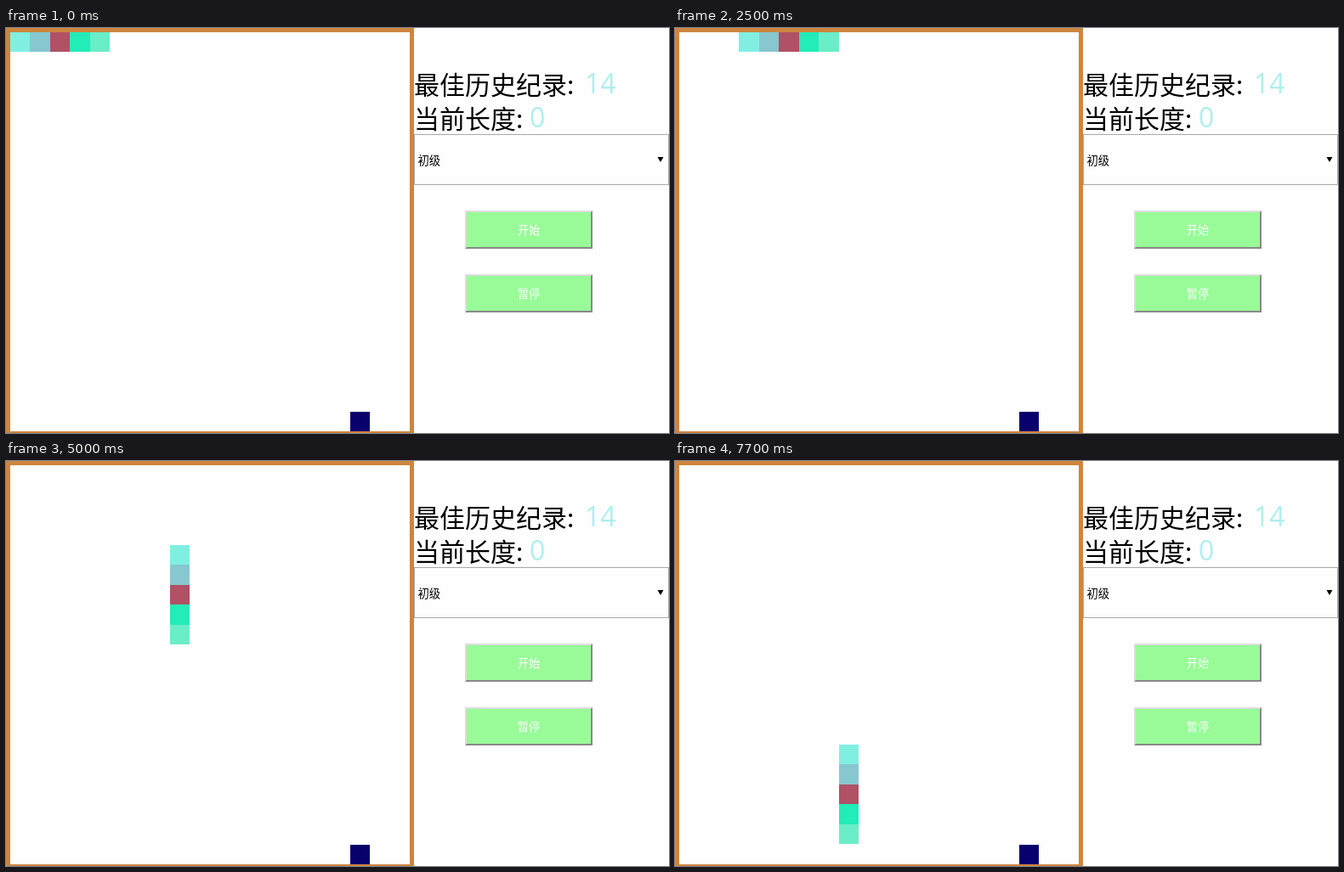
Recreate the animation shown at these times as an HTML page. Size 780x477 px, loop 8000 ms.

```html
<!DOCTYPE html>
<html lang="zh">
<head>
<meta charset="utf-8">
<style>
html, body { margin: 0; width: 100%; height: 100%; overflow: hidden; background: #fefefe; }
svg { display: block; }
text { font: 13.33px 'Noto Sans CJK SC', 'Noto Sans CJK', sans-serif; }
.label { font-size: 30px; }
.num { font: 32px 'Open Sans', 'Noto Sans', sans-serif; fill: #afeeee; }
.btn text { fill: #fff; text-anchor: middle; }
.light { fill: #ddd; }
.dark { fill: #888; }
.down .light { fill: #888; }
.down .dark { fill: #ddd; }
</style>
</head>
<body>
<svg width="780" height="477" viewBox="0 0 780 477">
  <rect x="2.5" y="2.5" width="475" height="475" fill="#fefefe" stroke="#cd853f" stroke-width="5"/>
  <rect x="0" y="475" width="480" height="2" fill="#cd853f"/>
  <rect x="405" y="452" width="23" height="23" fill="#08006c"/>
  <g id="snake" shape-rendering="crispEdges"></g>

  <text class="label" x="480" y="78">最佳历史纪录:</text>
  <text class="num" x="681" y="77">14</text>
  <text class="label" x="480" y="118">当前长度:</text>
  <text class="num" x="616" y="117">0</text>

  <rect id="select" x="480.5" y="125.5" width="299" height="59" fill="#fefefe" stroke="#a9a9a9"/>
  <text x="484.5" y="161">初级</text>
  <path d="M766.5 152h7l-3.5 6z"/>

  <g id="buttons"></g>
</svg>
<script>
const LOOP = 8000, CELL = 23.5, TURN = 8;
const colors = ['#80efe2', '#87c7d0', '#b05166', '#22ecb8', '#6aeec8'];
const $ = id => document.getElementById(id);
const edge = i => Math.floor(5 + CELL * i);

const button = (y, label) => `<g class="btn" transform="translate(540 ${y})">
  <path class="light" d="M0 0H150L148 2H2V43L0 45z"/>
  <path class="dark" d="M150 0V45H0L2 43H148V2z"/>
  <rect x="2" y="2" width="146" height="41" fill="#98fb98"/>
  <text x="75" y="28">${label}</text></g>`;

$('buttons').innerHTML = button(215, '开始') + button(290, '暂停');
$('snake').innerHTML = colors.map(c => `<rect fill="${c}"/>`).join('');
const start = $('buttons').firstElementChild;
const parts = [...$('snake').children];

function draw(now) {
  const t = Math.floor(now % LOOP / 100) * 100;
  const moves = Math.max(0, Math.floor((t - 1900) / 275) + 1);
  parts.forEach((part, i) => {
    // the path runs right along the top row, then down
    const p = moves + i;
    const col = Math.min(p, TURN), row = Math.max(0, p - TURN);
    const x = edge(col), y = edge(row);
    part.setAttribute('x', x);
    part.setAttribute('y', y);
    part.setAttribute('width', edge(col + 1) - x);
    part.setAttribute('height', edge(row + 1) - y);
  });
  $('select').setAttribute('stroke', t === 500 ? '#767676' : '#a9a9a9');
  start.classList.toggle('down', t === 1600);
}

const begin = performance.now();
function tick() {
  draw(performance.now() - begin);
  requestAnimationFrame(tick);
}
tick();
</script>
</body>
</html>
```
